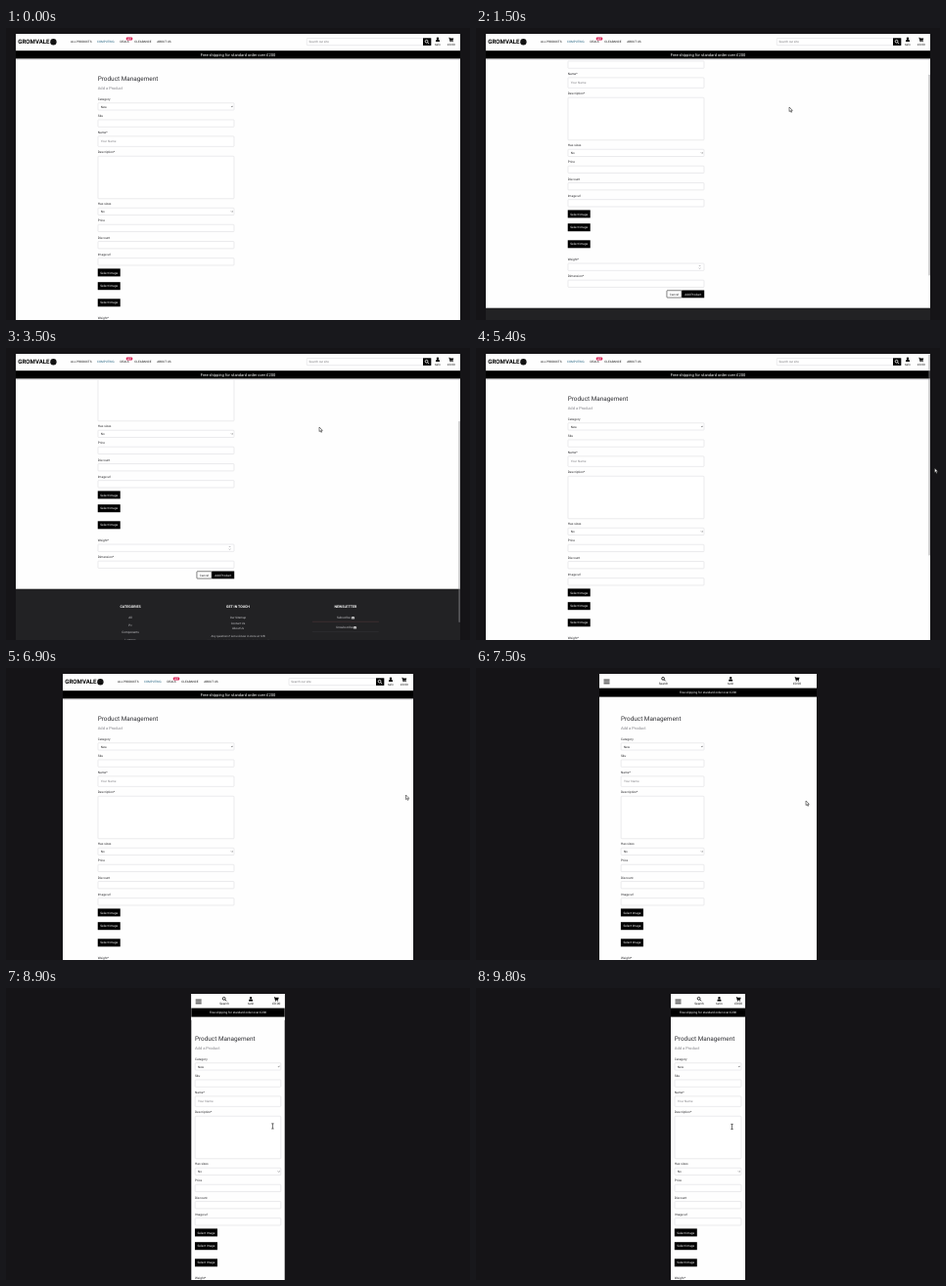
Animation of 474x299 px, one loop 10000 ms. Source, as an HTML page:

```html
<!DOCTYPE html>
<html lang="en">
<head>
<meta charset="utf-8">
<title>Responsive product form</title>
<style>
  html, body { margin: 0; width: 100%; height: 100%; overflow: hidden; background: #151417; }
  svg { display: block; width: 100vw; height: 100vh; font-family: Roboto, Arial, sans-serif; }
</style>
</head>
<body>
<svg id="stage" viewBox="0 0 474 299" text-rendering="geometricPrecision"></svg>
<script>
const LOOP = 10000, STEP = 100, CENTER = 237, UNIT = 0.258;
const INK = '#29292c', GREY = '#85858a', EDGE = '#d6d6da';

// Each row: time, value(s)
const LEFT = [[6200, 10], [6500, 24], [6900, 58], [7300, 108], [7700, 144], [8200, 177],
  [8400, 180], [9000, 191], [9500, 199]];
const SCROLL = [[1000, 0], [1200, 14], [1500, 60], [1800, 110], [2100, 139], [3200, 139],
  [3500, 100], [3800, 41], [4000, 41], [4200, 10], [4300, 0]];
const POINTER = [[4700, 320, 81], [4900, 345, 89], [5200, 445, 117], [5400, 468.5, 123],
  [5500, 468.5, 123], [5800, 469, 121], [6000, 468.5, 127], [6200, 468.5, 127],
  [6500, 450, 128], [6900, 408.5, 130], [7300, 356, 134], [7700, 318, 138],
  [8200, 285, 140.5], [8400, 281.5, 141], [9500, 261.5, 142]];

function sample(rows, t) {
  const i = rows.findIndex(r => r[0] > t);
  if (i === 0) return rows[0].slice(1);
  if (i < 0) return rows[rows.length - 1].slice(1);
  const a = rows[i - 1], b = rows[i], k = (t - a[0]) / (b[0] - a[0]);
  return a.slice(1).map((v, j) => v + (b[j + 1] - v) * k);
}

const rect = (x, y, w, h, fill, extra = '') =>
  `<rect x="${x}" y="${y}" width="${w}" height="${h}" fill="${fill}" ${extra}/>`;
const frame = (x, y, w, h, color = EDGE) =>
  rect(x + .25, y + .25, w - .5, h - .5, '#fff', `stroke="${color}" stroke-width=".5" rx=".6"`);
const text = (x, y, size, str, fill = INK, anchor = 'start', weight = 400) =>
  `<text x="${x}" y="${y + size * .36}" font-size="${size}" fill="${fill}" text-anchor="${anchor}" font-weight="${weight}">${str}</text>`;
const mid = (x, y, size, str, fill, weight) => text(x, y, size, str, fill, 'middle', weight);
const dot = (x, y, r, fill) => `<circle cx="${x}" cy="${y}" r="${r}" fill="${fill}"/>`;
const line = (d, color, width) =>
  `<path d="${d}" fill="none" stroke="${color}" stroke-width="${width}"/>`;

const lens = (x, y, color) =>
  line(`M${x - 1.8} ${y - .4}a1.4 1.4 0 1 1 2.8 0a1.4 1.4 0 1 1-2.8 0M${x + .6} ${y + .6}l1.5 1.5`, color, .8);
const person = (x, y) => dot(x, y - 1.1, 1.2, '#000') +
  `<path d="M${x - 2} ${y + 2.2}v-.7q0-1.3 1.3-1.3h1.4q1.3 0 1.3 1.3v.7z"/>`;
const cart = (x, y) => `<path d="M${x - 2.4} ${y - 2}h1l.3.6h3.6l-.7 2.3h-2.7l.2.5h2.5v.5h-3l-.9-3.3h-.3z"/>` +
  dot(x - .7, y + 1.9, .5, '#000') + dot(x + 1.4, y + 1.9, .5, '#000');
const mail = (x, y) => rect(x, y - 1.1, 3.2, 2.3, '#ddd') +
  line(`M${x} ${y - .8}l1.6 1.1l1.6-1.1`, '#222', .4);

function wideHeader(l, r) {
  const w = r - l, searchW = .31 * w - 13.5, searchX = r - 29.7 - searchW;
  const items = [['ALL PRODUCTS', 56], ['COMPUTING', 83, '#21617f'], ['DEALS', 106.5],
    ['CLEARANCE', 121.3], ['ABOUT US', 144.2]];
  return rect(l, 6, w, 27, '#fefefe') +
    text(l + 2.3, 14.2, 6.1, 'GROMVALE', '#000', 'start', 700) + dot(l + 38.4, 14.2, 3.2, '#111') +
    items.map(([s, x, c]) => text(l + x, 14.3, 3.05, s, c || '#111')).join('') +
    rect(l + 112.8, 9.4, 6.4, 3.2, '#d5194f', 'rx="1"') + mid(l + 116, 11, 2.3, 'HOT', '#fff', 700) +
    frame(searchX, 10.3, searchW, 7.6) + text(searchX + 2.5, 14.2, 3.05, 'Search our site', '#77777b') +
    rect(r - 38, 10.3, 8.3, 7.6, '#000') + lens(r - 34, 14.1, '#fff') +
    person(r - 23, 11.8) + mid(r - 23, 16.6, 3, 'tarin', '#111') +
    cart(r - 9.2, 11.8) + mid(r - 9.2, 16.6, 3, '£0.00', '#111') +
    rect(l, 23.2, w, 8.2, '#000') + rect(l, 32.2, w, .8, '#e3e0e5') +
    mid(CENTER, 27.3, 4.06, 'Free shipping for standard order over £200', '#fff');
}

function narrowHeader(l, r) {
  const w = r - l, col = (base, k) => l + base + k * w;
  const spots = [[lens, col(10, .25), 'Search'], [person, col(5.4, .58), 'tarin'], [cart, col(0, .91), '£0.00']];
  return rect(l, 6, w, 27, '#fefefe') +
    [11.6, 13.5, 15.4].map(y => rect(l + 4.5, y, 6, .9, '#111')).join('') +
    spots.map(([icon, x, s]) => icon(x, 11.2, '#000') + mid(x, 16.1, 3.15, s, '#111')).join('') +
    rect(l, 20.6, w, 9, '#000') +
    mid(CENTER, 25.1, 3.08, 'Free shipping for standard order over £200', '#fff');
}

function form(x, w) {
  const label = (y, s) => text(x, y, 3.2, s);
  const box = (y, h = 7.8) => frame(x, y, w, h);
  const select = (y, s) => box(y) + text(x + 3, y + 4, 3.1, s) +
    line(`M${x + w - 3.2} ${y + 3.5}l.9 .9l.9-.9`, INK, .5);
  const pick = y => rect(x, y, 23, 8, '#000') + mid(x + 11.5, y + 4, 3.1, 'Select Image', '#fff');
  const end = x + w;
  return text(x, 51.2, 6.4, 'Product Management', '#303034') +
    text(x, 61.3, 4.05, 'Add a Product', GREY) +
    label(72.5, 'Category') + select(76.5, 'New') +
    label(90, 'Sku') + box(93.7) +
    label(107, 'Name*') + box(110.6, 11) + text(x + 3, 116.1, 3.2, 'Your Name', GREY) +
    label(127.1, 'Description*') + box(131, 44) +
    label(180.2, 'Has sizes') + select(184, 'No') +
    label(197.2, 'Price') + box(201) +
    label(214.4, 'Discount') + box(218.3) +
    label(231.6, 'Image url') + box(235.4) +
    pick(246.4) + pick(260.2) + pick(277.3) +
    label(296.7, 'Weight*') + box(300.8) +
    line(`M${end - 5.4} 304l.8-.9l.8 .9M${end - 5.4} 305.6l.8 .9l.8-.9`, GREY, .5) +
    label(314, 'Dimension*') + box(317.9) +
    frame(end - 38.5, 328.5, 15.6, 7.8, '#000') + mid(end - 30.7, 332.4, 3.1, 'Cancel') +
    rect(end - 23, 328.5, 23, 7.8, '#000') + mid(end - 11.5, 332.4, 3.1, 'Add Product', '#fff');
}

function footer(l, w) {
  const soft = '#c9c9cc', gap = w * .242;
  const list = (x, y, gapY, size, rows) =>
    rows.map((s, i) => mid(x, y + i * gapY, size, s, soft)).join('');
  const a = CENTER - gap, c = CENTER + gap;
  return rect(l, 346.7, w, 100, '#222224') +
    mid(a, 365, 3.6, 'CATEGORIES', '#fff', 700) +
    mid(CENTER, 365, 3.6, 'GET IN TOUCH', '#fff', 700) +
    mid(c, 365, 3.6, 'NEWSLETTER', '#fff', 700) +
    list(a, 376.2, 7.5, 3.1, ['All', 'Pc', 'Components', 'Laptops', 'Monitors']) +
    list(CENTER, 376.4, 5.4, 3, ['Our Sitemap', 'Contact Us', 'About Us']) +
    list(CENTER, 394.6, 5.4, 2.9, ['Any questions? Let us know in store at 12B',
      'Orlwick, North Fell, United Kingdom, Bridge or call', 'us on (+00) 00 00 00000']) +
    [-10, -2, 6].map(d => dot(CENTER + d, 416.2, 1.5, '#eee')).join('') +
    mid(c - 2, 376.2, 3.1, 'Subscribe', soft) + mail(c + 6, 376.2) +
    rect(c - 34, 379.9, 68, .5, '#54383b') +
    mid(c - 1, 386.2, 3.1, 'Unsubscribe', soft) + mail(c + 8, 386.2) +
    rect(c - 34, 390, 68, .4, '#37373a');
}

// Bootstrap-like container: [min window width, container width]
function column(l, w) {
  const fit = [[1200, 1140], [992, 960], [768, 720], [576, 540]].find(([min]) => w >= min * UNIT);
  const outer = fit ? fit[1] * UNIT : w;
  const half = w >= 768 * UNIT;
  return [CENTER - outer / 2 + 3.8, (half ? outer / 2 : outer) - 7.6];
}

function pointer(x, y, beam) {
  if (beam) return line(`M${x - 1.2} ${y - 2.6}h2.4M${x} ${y - 2.6}v5.2M${x - 1.2} ${y + 2.6}h2.4`, '#333', .7);
  return `<path d="M${x} ${y}v4.6l1.1-.9l.8 1.7l.8-.4l-.8-1.6h1.4z" fill="#fff" stroke="#222" stroke-width=".55"/>`;
}

function scene(t) {
  const [l] = sample(LEFT, t), [scroll] = sample(SCROLL, t), [px, py] = sample(POINTER, t);
  const r = 2 * CENTER - l, w = r - l;
  const header = w >= 992 * UNIT ? wideHeader : narrowHeader;
  const showBar = t >= 500 && t < 6300;
  return `<clipPath id="view"><rect x="${l}" y="6" width="${w}" height="293"/></clipPath>` +
    rect(0, 0, 474, 299, '#151417') +
    `<g clip-path="url(#view)">${rect(l, 6, w, 293, '#fefefe')}` +
    `<g transform="translate(0 ${-scroll})">${form(...column(l, w))}${footer(l, w)}</g>` +
    header(l, r) +
    (showBar ? rect(r - 1.5, 6.5 + scroll * .684, 1.2, 206, '#8c8c90', 'rx=".6" opacity=".7"') : '') +
    '</g>' + (t >= 500 ? pointer(px, py, w < 768 * UNIT) : '');
}

const stage = document.getElementById('stage');
const start = performance.now();
let shown = '';
function play() {
  const t = Math.floor(((performance.now() - start) % LOOP) / STEP) * STEP;
  const next = scene(t);
  if (next !== shown) stage.innerHTML = shown = next;
  requestAnimationFrame(play);
}
play();
</script>
</body>
</html>
```
